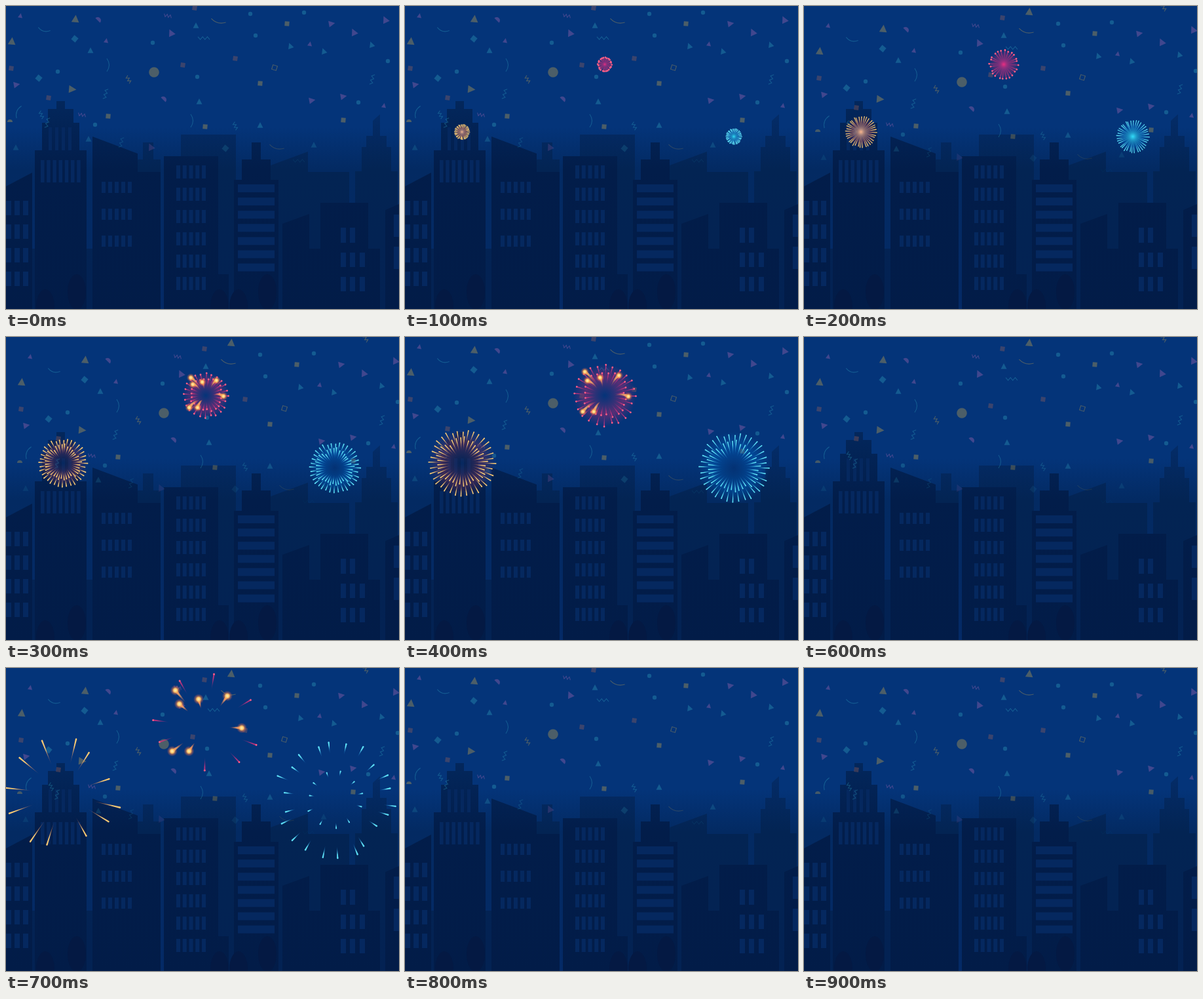
Animation of 600x462 px, one loop 1 s. Source, as an HTML page with a canvas:

```html
<!DOCTYPE html>
<html lang="en">
<head>
<meta charset="utf-8">
<title>Night city fireworks</title>
<style>
  html, body { margin: 0; width: 100%; height: 100%; overflow: hidden; background: #043479; }
  canvas { display: block; }
</style>
</head>
<body>
<canvas id="stage" width="600" height="462"></canvas>
<script>
const g = document.getElementById('stage').getContext('2d');
const TAU = Math.PI * 2;
const noise = n => { const v = Math.sin(n * 91.7 + 3.1) * 4375.85; return v - Math.floor(v); };
const steps = (from, gap, n) => Array.from({ length: n }, (_, i) => from + gap * i);

function poly(...p) {
  g.beginPath();
  for (let i = 0; i < p.length; i += 2) g.lineTo(p[i], p[i + 1]);
  g.closePath();
  g.fill();
}
function box(x0, y0, x1, y1 = 462) { g.fillRect(x0, y0, x1 - x0, y1 - y0); }
function dot(x, y, r) { g.beginPath(); g.arc(x, y, r, 0, TAU); g.fill(); }
function panes(xs, ys, w, h) {
  for (const y of ys) for (const x of xs) g.fillRect(x, y, w, h);
}
function vertical(...stops) {
  const grad = g.createLinearGradient(0, 0, 0, 462);
  for (const [y, c] of stops) grad.addColorStop(y / 462, c);
  return grad;
}
function radial(x, y, r, ...stops) {
  const grad = g.createRadialGradient(x, y, 0, x, y, r);
  for (const [p, c] of stops) grad.addColorStop(p, c);
  g.fillStyle = grad;
  dot(x, y, r);
}

function city() {
  g.fillStyle = vertical([0, '#043479'], [185, '#043479'], [250, '#032a62'], [462, '#042a66']);
  box(0, 0, 600);

  // far skyline
  g.fillStyle = vertical([165, '#042c68'], [250, '#032453'], [462, '#032253']);
  box(209, 208, 225, 240);
  box(201, 234, 236);
  box(267, 196, 351);
  poly(404, 243, 461, 222, 461, 462, 404, 462);
  box(416, 253, 524);
  poly(560, 175, 571, 165, 571, 200, 560, 200);
  box(550, 198, 581, 216);
  box(543, 215, 588, 253);
  box(533, 252, 598);
  box(40, 370, 132);

  // near buildings
  g.fillStyle = vertical([145, '#03275c'], [250, '#021d4a'], [462, '#021c48']);
  poly(0, 275, 40, 254, 40, 462, 0, 462);
  box(77, 145, 90, 158);
  box(64, 157, 103, 179);
  box(55, 178, 112, 221);
  box(44, 220, 123);
  poly(132, 199, 201, 225, 201, 253, 236, 253, 236, 462, 132, 462);
  box(241, 229, 324);
  box(324, 409, 340);
  box(375, 208, 389, 235);
  box(360, 234, 404, 266);
  box(348, 265, 416);
  poly(422, 332, 463, 317, 463, 462, 422, 462);
  box(480, 300, 553);
  box(463, 370, 571);
  poly(579, 311, 600, 302, 600, 462, 579, 462);

  g.fillStyle = '#05285f';
  panes([0, 13, 26], steps(297, 36, 4), 8, 22);
  panes(steps(65, 10, 4), [185], 5, 35);
  panes(steps(53, 9.2, 7), [235], 5.5, 34);
  panes(steps(146, 10, 5), steps(268, 41, 3), 6, 17);
  panes(steps(260, 9.75, 5), steps(243, 34, 6), 6, 20);
  panes([354], steps(272, 20.1, 7), 56, 12);
  panes([511, 525], [338], 8, 23);
  panes([511, 525, 540], [376, 413], 8, 22);
  panes([592], [318, 367], 8, 34);

  g.fillStyle = '#041943';
  for (const x of [60, 108, 326, 355, 399]) {
    const tall = x === 108 || x === 399;
    g.beginPath();
    g.ellipse(x, tall ? 436 : 459, 14, 27, 0, 0, TAU);
    g.fill();
  }
}

const shapes = {
  triangle: s => poly(0, -s, s * 0.9, s * 0.75, -s * 0.9, s * 0.75),
  square: s => g.fillRect(-s / 2, -s / 2, s, s),
  frame: s => g.strokeRect(-s / 2, -s / 2, s, s),
  disc: s => dot(0, 0, s),
  half: s => { g.beginPath(); g.arc(0, 0, s, 0, Math.PI); g.fill(); },
  bow: s => {
    g.beginPath();
    g.moveTo(-s / 2, -2);
    g.quadraticCurveTo(0, 5, s / 2, -2);
    g.stroke();
  },
  zigzag: s => {
    g.beginPath();
    for (let i = 0; i < 6; i++) g.lineTo((i / 5 - 0.5) * s, i % 2 ? 2.2 : -2.2);
    g.stroke();
  }
};

// shape, colour, size, turn in degrees, then x, y of each piece
const PURPLE = '#b86cb8', TEAL = '#35a8c0', YELLOW = '#d8b048', ROSE = '#a86458';
const confettiKinds = [
  ['triangle', PURPLE, 6, -25, 252, 41, 531, 40, 579, 21, 221, 215],
  ['triangle', PURPLE, 5.5, 80, 497, 27, 16, 120, 467, 144, 515, 138],
  ['triangle', PURPLE, 4, 10, 22, 15, 153, 53, 464, 58, 577, 152],
  ['triangle', TEAL, 5, 0, 290, 30, 129, 68, 295, 146, 388, 182, 470, 212, 126, 203, 15, 216],
  ['triangle', TEAL, 5, -20, 434, 61, 485, 69, 558, 59],
  ['triangle', YELLOW, 6.5, 5, 106, 20, 9, 54, 329, -6],
  ['triangle', YELLOW, 6.5, 95, 101, 127],
  ['square', ROSE, 7, 8, 8, 95, 65, 140, 270, 90, 350, 80, 288, 3],
  ['square', YELLOW, 7, 5, 429, 27, 388, 118, 156, 168, 304, 184, 515, 174],
  ['square', TEAL, 8, 40, 105, 50, 50, 110, 335, 217],
  ['frame', YELLOW, 7, 18, 410, 94],
  ['disc', TEAL, 3.2, 0, 79, 100, 224, 56, 373, 12, 455, 10, 381, 45, 292, 108, 583, 84, 538, 147, 136, 181],
  ['disc', YELLOW, 7.8, 0, 226, 101],
  ['half', YELLOW, 4, 180, 6, 177],
  ['half', PURPLE, 5, -135, 140, 22, 240, 143],
  ['bow', TEAL, 19, 15, 58, 37],
  ['bow', TEAL, 20, -90, 156, 90, 284, 175],
  ['bow', TEAL, 20, 112, 18, 161],
  ['bow', YELLOW, 23, 15, 324, 24, 413, 216],
  ['zigzag', TEAL, 18, 0, 302, 49, 447, 236],
  ['zigzag', TEAL, 16, 105, 152, 134, 559, 112, 176, 208, 63, 178],
  ['zigzag', TEAL, 12, 65, 54, 166, 350, 183],
  ['zigzag', PURPLE, 12, 12, 247, 15, 116, 166],
  ['zigzag', YELLOW, 12, 60, 187, 112, 534, -13]
];

function confetti(shift) {
  g.lineWidth = 1.1;
  for (const [shape, colour, size, turn, ...at] of confettiKinds) {
    g.fillStyle = g.strokeStyle = colour;
    for (let i = 0; i < at.length; i += 2) {
      const y = at[i + 1] + shift;
      g.save();
      g.globalAlpha = 0.34 * Math.max(0.12, Math.min(1, 1 - (y - 185) / 70));
      g.translate(at[i] + shift, y);
      g.rotate(turn * TAU / 360);
      shapes[shape](size);
      g.restore();
    }
  }
}

// a streak runs outwards along angle a and widens towards its head
function streak(b, a, r0, r1, w) {
  g.save();
  g.translate(b.x, b.y);
  g.rotate(a);
  const grad = g.createLinearGradient(r0, 0, r1, 0);
  grad.addColorStop(0, b.tail);
  grad.addColorStop(0.7, b.head);
  g.fillStyle = grad;
  poly(r0, 0, r1, w / 2, r1, -w / 2);
  dot(r1, 0, w / 2);
  if (b.tip) {
    g.fillStyle = b.tip;
    dot(r1, 0, 1.4);
  }
  g.restore();
}

// glowing heads with curved tails, given at full burst size
const HEADS = [[-38, -45], [-33, -28], [-9, -34], [27, -38], [45, 2], [-21, 31], [-42, 31]];
function comets(b, scale) {
  const late = scale > 1.1, from = late ? 0.65 : 0.4;
  for (const [dx, dy] of HEADS) {
    for (let u = 0; u <= 1; u += 0.04) {
      const k = scale * (from + (1 - from) * u);
      g.fillStyle = `rgba(255,${110 + 95 * u},${80 + 40 * u},${u * 0.6})`;
      dot(b.x + dx * k, b.y + dy * k - (late ? 0 : 10 * u * (1 - u)), 0.5 + 1.8 * u);
    }
    radial(b.x + dx * scale, b.y + dy * scale, late ? 8 : 6.5,
      [0, '#fff3b8'], [0.35, '#ffc66a'], [0.6, 'rgba(245,130,70,.5)'], [1, 'rgba(230,80,80,0)']);
  }
}

const bursts = [
  { x: 305, y: 89, speed: 12.3, n: 48, sparks: 8, len: 0.3, glow: '235,45,130', halo: '120,45,115', haze: 0.7,
    tail: 'rgba(170,40,125,.1)', head: 'rgba(205,50,125,.85)', tip: '#ff5f86', comets: true },
  { x: 87, y: 192, speed: 13.4, n: 72, sparks: 12, len: 0.45, glow: '250,180,140', halo: '85,45,90', haze: 0.65,
    tail: 'rgba(205,95,85,.15)', head: '#f8c872' },
  { x: 502, y: 199, speed: 14, n: 72, sparks: 22, len: 0.2, glow: '50,220,250', halo: '0,95,185', haze: 0.5,
    tail: 'rgba(20,120,215,.1)', head: '#5bdcf4' }
];
const radius = (b, k) => b.speed * k * (0.85 + 0.03 * k);

// every second ray belongs to a shorter inner ring
function explode(b, k) {
  const r = radius(b, k), young = k < 3;
  const haze = b.haze * (k === 5 ? 0.75 : 1);
  radial(b.x, b.y, r, [0, `rgba(${b.halo},0)`], [0.2, `rgba(${b.halo},${haze * 0.3})`],
    [0.6, `rgba(${b.halo},${haze})`], [1, `rgba(${b.halo},0)`]);
  if (young) radial(b.x, b.y, r * 0.6, [0, `rgba(${b.glow},1)`], [0.35, `rgba(${b.glow},.6)`], [1, `rgba(${b.glow},0)`]);
  const n = young ? b.n / 2 : b.n;
  for (let i = 0; i < n; i++) {
    const inner = !young && i % 2;
    const far = r * (inner ? 0.6 + 0.18 * noise(i) : 0.9 + 0.1 * noise(i));
    const near = young ? r * 0.15 : far * (inner ? 0.45 : 0.58);
    streak(b, (i + 0.5 * noise(i + 40)) / n * TAU, near, far, young ? 1.3 : 1.7);
  }
  if (b.comets && !young) comets(b, k / 5);
}

function lastSparks(b) {
  const r = radius(b, 6.2);
  for (let i = 0; i < b.sparks; i++) {
    const a = (i + 0.6 * noise(i + 9)) / b.sparks * TAU, far = r * (0.85 + 0.2 * noise(i));
    streak(b, a, far * (1 - b.len), far, 2.4);
    if (b.sparks > 20 && i % 2) streak(b, a, far * 0.4, far * 0.5, 2);
  }
  if (b.comets) comets(b, 1.22);
}

// confetti hops diagonally between two places
const SHIFTED = [0, 0, 1, 1, 0, 0, 1, 1, 0, 1];
let shown = -1;

function render(ms) {
  const step = Math.floor(ms % 1000 / 100);
  if (step === shown) return;
  shown = step;
  city();
  confetti(15 * SHIFTED[step]);
  for (const b of bursts) {
    if (step > 0 && step < 6) explode(b, step);
    if (step === 7) lastSparks(b);
  }
}

const start = performance.now();
function loop() {
  render(performance.now() - start);
  requestAnimationFrame(loop);
}
loop();
</script>
</body>
</html>
```
